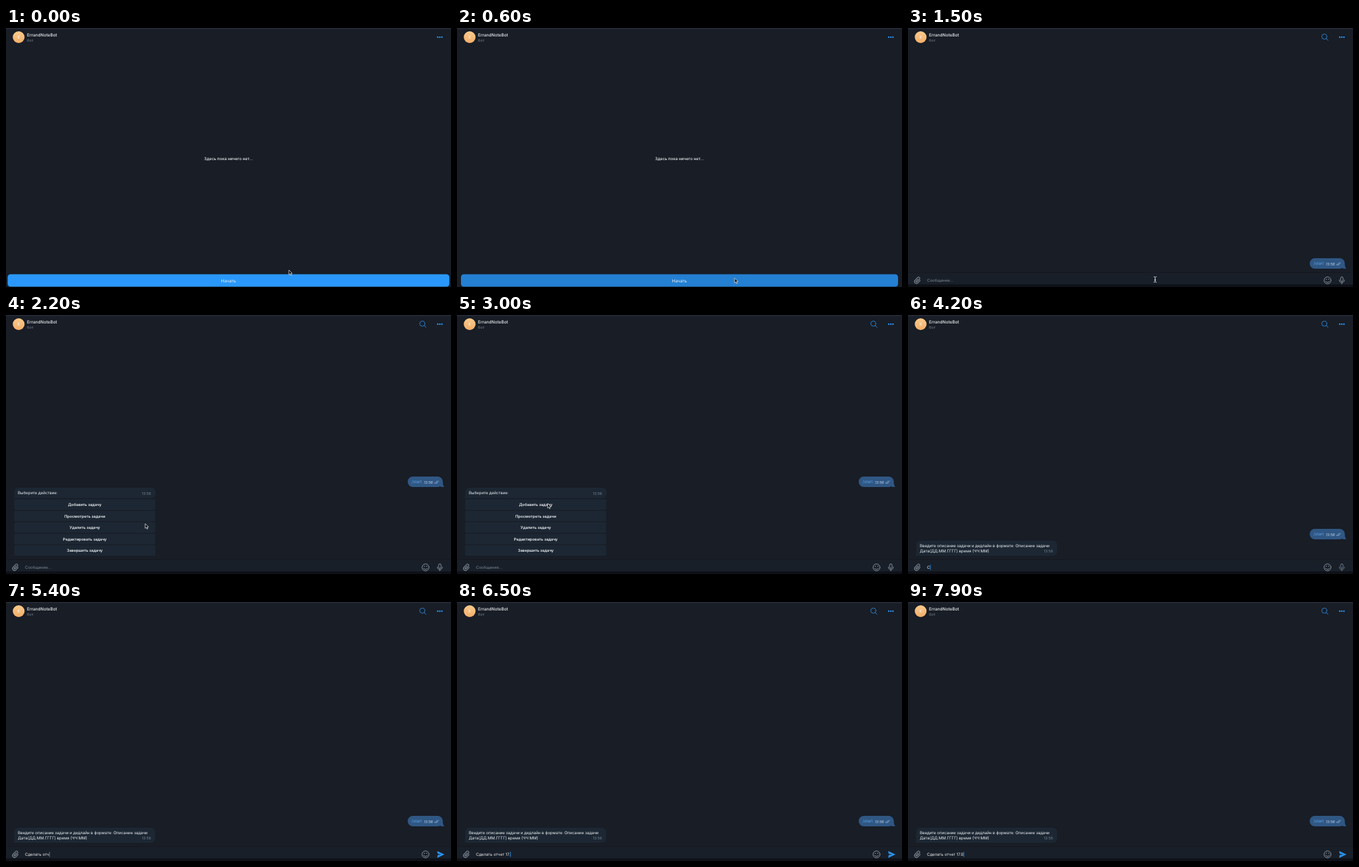
Animation of 678x396 px, one loop 8 s. Source, as an HTML page:

```html
<!DOCTYPE html>
<html lang="ru">
<head>
<meta charset="utf-8">
<style>
html, body { margin: 0; width: 100%; height: 100%; overflow: hidden; background: #181d26; }
svg { display: block; width: 678px; height: 396px; }
text { font: 6.1px Inter, "Open Sans", sans-serif; fill: #eef1f4; white-space: pre; text-rendering: geometricPrecision; }
.mid { text-anchor: middle; }
.bold { font-weight: 600; font-size: 5.9px; }
.dim { fill: #7b8896; }
.line { fill: none; stroke: #8a95a2; stroke-width: 1; stroke-linecap: round; stroke-linejoin: round; }
.blue { fill: #2b94ee; }
</style>
</head>
<body>
<svg viewBox="0 0 678 396">
  <defs>
    <linearGradient id="peach" x2="0" y2="1"><stop stop-color="#fbcb8c"/><stop offset="1" stop-color="#f3ae69"/></linearGradient>
    <clipPath id="feed"><path d="M0 28H678V370H0z"/></clipPath>
  </defs>
  <path d="M0 0H678V396H0z" fill="#181d26"/>
  <path d="M0 0H678V1.5H0z" fill="#272d38"/>

  <circle cx="19.3" cy="14" r="9" fill="url(#peach)"/>
  <text class="mid" x="19.3" y="16" style="font-size:5.5px;font-weight:600">E</text>
  <text x="32" y="12.6" style="font-size:6.5px;font-weight:500">ErrandNoteBot</text>
  <text class="dim" x="32" y="21" style="font-size:5.8px">бот</text>
  <g class="blue"><circle cx="657.8" cy="14" r="1.2"/><circle cx="661" cy="14" r="1.2"/><circle cx="664.2" cy="14" r="1.2"/></g>
  <path id="search" class="line" style="stroke:#2b7fca" d="M638.2 13.2a3.9 3.9 0 1 1-7.8 0a3.9 3.9 0 1 1 7.8 0M637.2 16.2l2.8 2.8"/>

  <text id="empty" class="mid" x="339" y="202.3" style="font-size:6.2px;font-weight:500">Здесь пока ничего нет...</text>

  <g clip-path="url(#feed)">
    <g id="sent">
      <path d="M620 352H657.500a8 8 0 0 1 8 8Q665.500 366 668 367.500Q664 368.500 661.500 367Q660 368 657.500 368H620a8 8 0 0 1 0-16z" fill="#305784"/>
      <text x="618" y="362.100" style="fill:#5ca5e4">/start</text>
      <text x="636.500" y="362.700" style="font-size:5.5px;font-style:italic;fill:#c5dbf0">13:56</text>
      <path class="line" style="stroke:#a9cdf0;stroke-width:.7" d="M652.500 361.200l1.300 1.400l3-3.800M655.500 362.300l.4 .4l3-3.900"/>
    </g>
    <g id="reply">
      <path id="bubble" fill="#1c2733"/>
      <text id="ask" x="18">Выберите действие:</text>
      <g id="prompt">
        <text x="18">Введите описание задачи и дедлайн в формате: Описание задачи</text>
        <text x="18" y="8">Дата(ДД.ММ.ГГГГ) время (ЧЧ:ММ)</text>
      </g>
      <text id="stamp" class="dim" x="207" style="font-size:5.5px">13:56</text>
      <g id="keys"></g>
    </g>
  </g>

  <g id="bar">
    <path d="M0 374H678V392H0z" fill="#191f28"/>
    <path d="M0 373.500H678V374.300H0z" fill="#12171e"/>
    <path d="M0 392H678V396H0z" fill="#0e1218"/>
    <path class="line" transform="translate(14.500 386) rotate(42)" d="M3-2.800V2.300a3 3 0 0 1-6 0V-3.400a2 2 0 0 1 4 0V2a1 1 0 0 1-2 0V-2.500"/>
    <circle class="line" cx="639.200" cy="385.900" r="5.300"/>
    <path class="line" d="M636.200 387.300q3 3.600 6 0"/>
    <circle cx="637.400" cy="384.300" r=".8" fill="#8a95a2"/><circle cx="641" cy="384.300" r=".8" fill="#8a95a2"/>
    <path id="mic" class="line" d="M661 380.500a1.900 1.900 0 0 1 1.900 1.900v3a1.900 1.900 0 0 1-3.800 0v-3a1.900 1.900 0 0 1 1.900-1.900M657.200 385.300a3.800 3.800 0 0 0 7.600 0M661 389.200v2.200"/>
    <path id="send" class="blue" d="M-5-5.300L6 0L-5 5.300L-4.300 1L1 0L-4.300-1z"/>
    <text id="hint" class="dim" x="29" y="388.100">Сообщение...</text>
    <text id="typed" x="29" y="388.100"></text>
    <path id="caret" class="blue" d="M0 382h.9v7.700H0z"/>
  </g>

  <g id="start">
    <rect id="button" y="376.500" height="19" rx="4.500"/>
    <text class="mid" x="339" y="388.500" style="font-size:6.6px">Начать</text>
  </g>

  <path id="arrow" d="M0 0V7.200L1.700 5.700L2.900 8.300L4.100 7.700L2.900 5.200H5.200z" fill="#0b0d10" stroke="#f4f4f4" stroke-width=".7"/>
  <path id="beam" class="line" style="stroke:#d5d9dd" d="M-1.800-4.200Q0-4.200 0-3V3Q0 4.200-1.800 4.200M1.800-4.200Q0-4.200 0-3V3Q0 4.200 1.800 4.200M-1 .8H1"/>
</svg>
<script>
const el = {};
document.querySelectorAll('[id]').forEach(e => el[e.id] = e);
const set = (e, attrs) => { for (const k in attrs) e.setAttribute(k, attrs[k]); };
const show = (e, alpha) => set(e, { opacity: +alpha });
const move = (e, x, y, more = '') => set(e, { transform: `translate(${x} ${y}) ${more}` });
const ramp = (t, a, b) => Math.min(1, Math.max(0, (t - a) / (b - a)));
const mix = (a, b, k) => a + (b - a) * k;
const easeOut = k => 1 - (1 - k) ** 3;

el.keys.innerHTML = ['Добавить', 'Просмотреть', 'Удалить', 'Редактировать', 'Завершить'].map((verb, i) => {
  const y = 281.8 + 17.5 * i;
  return `<rect x="12.5" y="${y}" width="215" height="16.300" rx="2" fill="#1c2733"/>
    <text class="mid bold" x="120" y="${y + 10.3}">${verb} задач${i == 1 ? 'и' : 'у'}</text>`;
}).join('');

// time, x, y
const path = [[0, 431, 370], [200, 425, 375.5], [400, 425, 375.5], [600, 423, 382.5], [1200, 423, 383],
  [1500, 376.5, 384.5], [1700, 345, 376], [2200, 212, 319], [2300, 208, 318], [2800, 138, 288],
  [3200, 138, 288], [3500, 217.5, 369.5], [3700, 219, 379]];

// time each further character appears
const phrase = 'Сделать отчет 17.0';
const strokes = [4200, 4300, 4500, 4500, 4600, 4700, 4800, 5100, 5100, 5200, 5400, 5600, 5700, 6100, 6100, 6200, 6300, 7900];

function cursorAt(t) {
  const i = path.findIndex(p => p[0] > t);
  if (i < 0) return path.at(-1).slice(1);
  const [a, b] = [path[i - 1], path[i]], k = ramp(t, a[0], b[0]);
  return [mix(a[1], b[1], k), mix(a[2], b[2], k)];
}

function drawChat(t) {
  const arrive = easeOut(ramp(t, 1600, 2100));
  const swap = ramp(t, 3250, 3700) ** 1.56;
  const enter = easeOut(ramp(t, 700, 1200));
  show(el.sent, enter);
  move(el.sent, 0, 18 * (1 - enter) - 105 * arrive + 80 * swap);

  show(el.reply, arrive);
  move(el.reply, 0, 105 * (1 - arrive));
  const top = mix(264, 345, swap), bottom = top + mix(16.2, 23, swap), right = mix(228, 227.3, swap);
  set(el.bubble, { d: `M19 ${top}H${right - 7}a7 7 0 0 1 7 7V${bottom - 7}a7 7 0 0 1-7 7H11Q12.500 ${bottom - 2} 12.500 ${bottom - 6}V${top + 6.5}a6.500 6.500 0 0 1 6.500-6.500z` });
  set(el.ask, { y: top + 10.2 });
  show(el.ask, 1 - swap);
  move(el.prompt, 0, top + mix(10.2, 9.7, swap));
  show(el.prompt, swap);
  set(el.stamp, { y: top + mix(10.6, 18, swap) });
  show(el.keys, 1 - swap);
  move(el.keys, 120, 325 + 80 * swap, `scale(${1 - swap / 3}) translate(-120 -325)`);
}

function drawInput(t) {
  const count = strokes.filter(s => s <= t).length;
  el.typed.textContent = phrase.slice(0, count);
  show(el.hint, !count);
  const blink = t >= 7000 && t < 7300 ? (t < 7100 ? .4 : 0) : 1;
  show(el.caret, count ? blink : 0);
  move(el.caret, 29.2 + (count ? el.typed.getComputedTextLength() : 0), 0);
  const swap = ramp(t, 4100, 4500);
  show(el.mic, 1 - swap);
  show(el.send, swap);
  move(el.send, 662, 386, `scale(${swap})`);
}

function draw(now) {
  const t = Math.floor(now % 8000 / 100) * 100;
  const chat = t >= 800, press = ramp(t, 400, 600);
  show(el.start, !chat);
  show(el.empty, !chat);
  show(el.bar, chat);
  show(el.search, ramp(t, 700, 900));
  const inset = mix(2.5, 6, press);
  set(el.button, { x: inset, width: 678 - 2 * inset, fill: `rgb(${mix(42, 36, press)},${mix(152, 128, press)},${mix(250, 210, press)})` });
  drawChat(t);
  drawInput(t);

  const [x, y] = cursorAt(t), beam = chat && y > 374;
  const visible = t < 4200;
  show(el.arrow, visible && !beam);
  show(el.beam, visible && beam);
  move(el.arrow, x, y);
  move(el.beam, x, y);
}

function tick() {
  draw(performance.now());
  requestAnimationFrame(tick);
}
tick();
</script>
</body>
</html>
```
